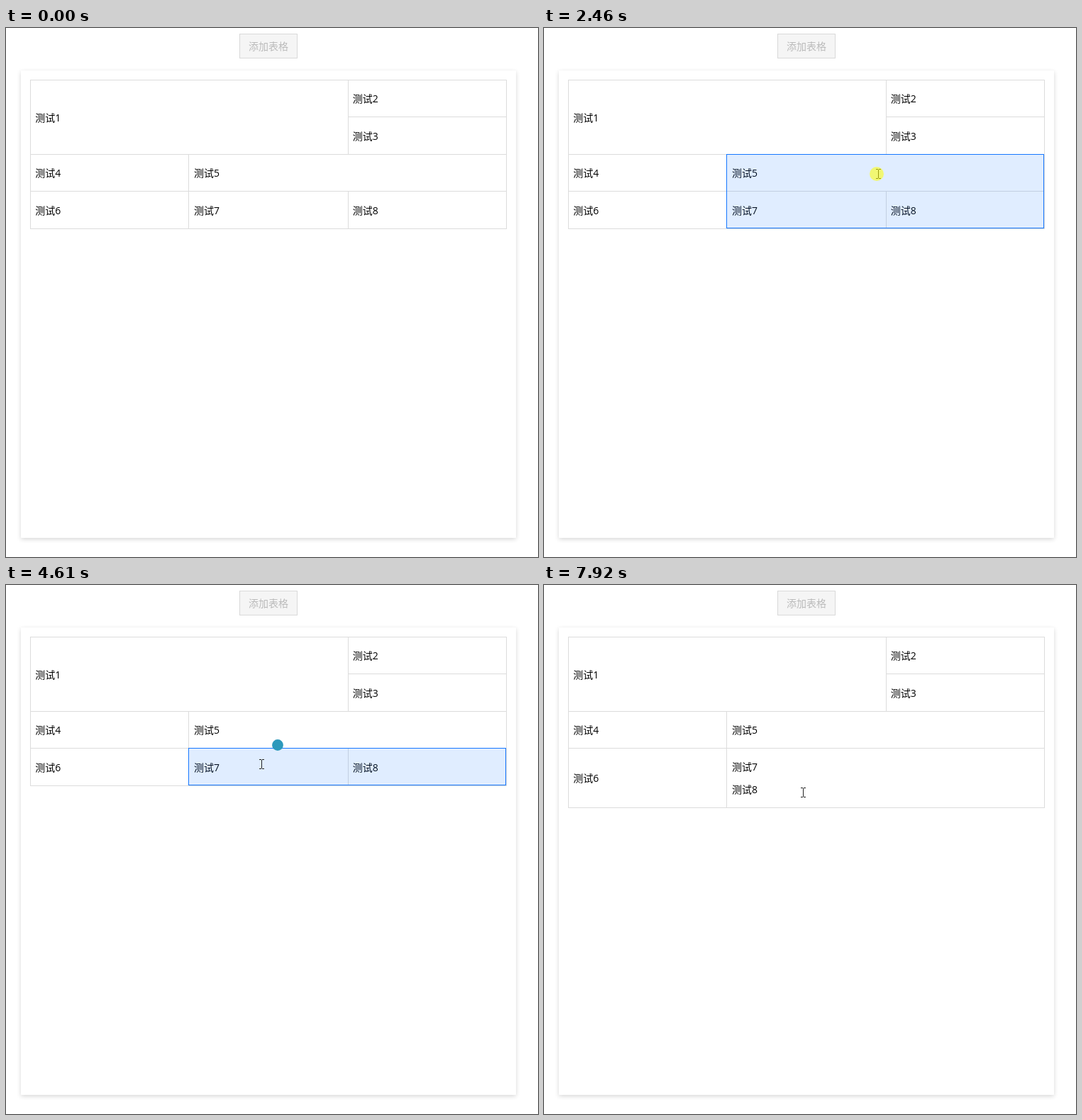
Recreate the animation shown at these times as an HTML page with a canvas. Size 750 by 747 pixels, loop 8 s.

```html
<!DOCTYPE html>
<html lang="zh-CN">
<head>
<meta charset="utf-8">
<title>表格合并</title>
<style>
html, body { margin: 0; width: 100%; height: 100%; overflow: hidden; background: #fff; }
canvas { display: block; width: 750px; height: 747px; }
</style>
</head>
<body>
<canvas id="stage" width="750" height="747"></canvas>
<script>
const ctx = document.getElementById('stage').getContext('2d');
const LOOP = 8000, STEP = 77;
const FONT = '"Open Sans", "Noto Sans CJK SC", "Noto Sans CJK", sans-serif';
const BLUE = '#1677ff', LINE = '#dcdcdc', INK = '#000';

// Grid lines, and one letter per slot as in grid-template-areas
const COLS = [34, 257, 482, 705], ROWS = [73, 125, 178, 230, 283];
const AREAS = ['112', '113', '455', '678'];

const ENTER = 60, MENU_OPEN = 5080, MERGE = 7280;
const DRAGS = [[830, 1535], [1755, 3230], [4060, 4540]];
const CLICKS = [[4990, MENU_OPEN], [7200, MERGE + 20]];
// Pointer moves: start, end, x, y; it rests in between
const MOVES = [
  [ENTER, 830, 528, 259], [930, 1195, 178, 141], [1540, 1750, 406, 234],
  [1850, 2290, 496, 241], [2300, 2460, 470, 205], [2690, 3060, 330, 133],
  [3250, 4060, 566, 256], [4180, 4450, 360, 253], [5200, 5690, 375, 408],
  [6120, 6490, 313, 315], [6490, 7050, 374, 441], [7300, 7921, 365, 293]
];

const MENU = { x: 357, y: 252, w: 110, h: 239 };
const GROUPS = [
  ['向上插入 1 行', '向下插入 1 行', '向左插入 1 列', '向右插入 1 列'],
  ['删除行', '删除列'],
  ['合并单元格', '取消合并']
];

const clamp = v => Math.max(0, Math.min(1, v));
const within = ([from, to], t) => t >= from && t < to;

function rect(x, y, w, h, color) {
  ctx.fillStyle = color;
  ctx.fillRect(x, y, w, h);
}

function frame(x, y, w, h, color) {
  ctx.strokeStyle = color;
  ctx.lineWidth = 1;
  ctx.strokeRect(x + .5, y + .5, w - 1, h - 1);
}

function disc(x, y, r, color) {
  ctx.fillStyle = color;
  ctx.beginPath();
  ctx.arc(x, y, r, 0, Math.PI * 2);
  ctx.fill();
}

function text(str, x, mid, size, color = INK) {
  ctx.font = `${size}px ${FONT}`;
  ctx.fillStyle = color;
  ctx.fillText(str, x, Math.round(mid + size * .36));
}

function panel({ x, y, w, h }, radius, dy, blur, shade) {
  ctx.save();
  ctx.shadowColor = `rgba(0,0,0,${shade})`;
  ctx.shadowOffsetY = dy;
  ctx.shadowBlur = blur;
  ctx.fillStyle = '#fff';
  ctx.beginPath();
  ctx.roundRect(x, y, w, h, radius);
  ctx.fill();
  ctx.restore();
}

function pointer(t) {
  let x = 640, y = 586;
  for (const [from, to, tx, ty] of MOVES) {
    const p = clamp((t - from) / (to - from));
    x += (tx - x) * p;
    y += (ty - y) * p;
  }
  return { x: Math.round(x), y: Math.round(y) };
}

// Slot range of a cell: left, top, right, bottom
function span(id, areas = AREAS) {
  const rows = areas.map((row, i) => row.includes(id) ? i : -1).filter(i => i >= 0);
  const row = areas[rows[0]];
  return [row.indexOf(id), rows[0], row.lastIndexOf(id) + 1, rows[rows.length - 1] + 1];
}

const ids = areas => [...new Set(areas.join(''))];

function cellAt({ x, y }) {
  const slot = (lines, v) => Math.max(0, lines.findLastIndex(line => v >= line));
  return AREAS[slot(ROWS, y)][slot(COLS, x)];
}

// Smallest box around two cells that cuts through no merged cell
function cover(a, b) {
  const join = (p, q) => p.map((v, i) => i < 2 ? Math.min(v, q[i]) : Math.max(v, q[i]));
  let box = join(span(a), span(b));
  for (let pass = 0; pass < 3; pass++) {
    for (const s of ids(AREAS).map(id => span(id))) {
      const hit = s[0] < box[2] && s[2] > box[0] && s[1] < box[3] && s[3] > box[1];
      if (hit) box = join(box, s);
    }
  }
  return box;
}

const textX = col => 41.3 + col * 223.67;

function drawTable(merged) {
  const areas = merged ? [...AREAS.slice(0, 3), '677'] : AREAS;
  const lines = merged ? [...ROWS.slice(0, 4), 314] : ROWS;
  for (const id of ids(areas)) {
    const [l, t, r, b] = span(id, areas);
    frame(COLS[l], lines[t], COLS[r] - COLS[l] + 1, lines[b] - lines[t] + 1, LINE);
    const mid = (lines[t] + lines[b]) / 2 + 1;
    const labels = merged && id === '7' ? ['7', '8'] : [id];
    labels.forEach((label, i) =>
      text('测试' + label, textX(l), mid + (i - (labels.length - 1) / 2) * 31.5, 14));
  }
}

function drawSelection(t) {
  const drag = DRAGS.findLast(([press]) => t >= press);
  if (!drag || t >= MERGE) return;
  const from = cellAt(pointer(drag[0]));
  const to = cellAt(pointer(Math.max(drag[0], Math.min(t - STEP, drag[1]))));
  if (from === to) {
    const [l, top] = span(from);
    rect(Math.round(textX(l) + 34.5), ROWS[top] + 19, 1, 17, INK);
    return;
  }
  const [l, top, r, b] = cover(from, to);
  const box = [COLS[l], ROWS[top], COLS[r] - COLS[l], ROWS[b] - ROWS[top]];
  rect(...box, BLUE + '22');
  frame(...box, BLUE);
}

// Round badge that pops up beside the pointer after each drag
function drawBadge(t) {
  DRAGS.forEach(([, release], i) => {
    const end = DRAGS[i + 1] ? DRAGS[i + 1][0] + 150 : MERGE;
    if (!within([release, end], t)) return;
    const { x, y } = pointer(release);
    disc(x + 23, y - 27, 12.5 * Math.min(1, .4 + (t - release) / 300), '#2d99bb');
  });
}

function inMenu({ x, y }, t) {
  return t > 5200 && t < MERGE && x > MENU.x && x < MENU.x + MENU.w
    && y > MENU.y + 8 && y < MENU.y + MENU.h - 8;
}

function drawMenu(t, pos) {
  const alpha = clamp((t - MENU_OPEN + 60) / 140) * clamp((MERGE + 150 - t) / 150);
  if (t < MENU_OPEN || !alpha) return;
  ctx.save();
  ctx.globalAlpha = alpha;
  panel(MENU, 3, 4, 16, .22);
  let y = MENU.y + 22.4;
  GROUPS.forEach((group, i) => {
    if (i) {
      rect(MENU.x + 3, Math.round(y - 15), MENU.w - 6, 1, '#e2e2e2');
    }
    for (const label of group) {
      const hover = inMenu(pos, t) && Math.abs(pos.y - y) < 13.5;
      const color = label === '取消合并' ? '#bdbdbd' : hover ? BLUE : INK;
      text(label, MENU.x + 10, y, 12, color);
      y += 27;
    }
    y += 2.7;
  });
  ctx.restore();
}

function drawBeam(x, y) {
  rect(x, y - 6, 1, 12, '#222');
  for (const edge of [-7, 6]) {
    rect(x - 3, y + edge, 3, 1, '#222');
    rect(x + 1, y + edge, 3, 1, '#222');
  }
}

const HAND = new Path2D('M4 11V1.5Q5.5-.5 7 1.5V6L12 7Q14 8 13.5 11L12 17H5L.5 10.5Q1 8.5 4 11Z');

function drawHand(x, y) {
  ctx.save();
  ctx.translate(x - 5, y);
  ctx.fillStyle = '#fff';
  ctx.fill(HAND);
  ctx.strokeStyle = '#111';
  ctx.lineWidth = 1;
  ctx.stroke(HAND);
  ctx.restore();
}

function drawPointer(t, pos) {
  if (t < ENTER) return;
  (inMenu(pos, t) ? drawHand : drawBeam)(pos.x, pos.y);
  if ([...DRAGS, ...CLICKS].some(press => within(press, t))) {
    disc(pos.x - 2, pos.y, 10, 'rgba(255,255,0,.55)');
  }
}

function draw(now) {
  // The picture refreshes in even steps
  const t = Math.floor((now % LOOP + 12) / STEP) * STEP - 10;
  const pos = pointer(t);

  rect(0, 0, 750, 747, '#fff');
  rect(329, 8, 82, 35, '#f5f5f5');
  frame(329, 8, 82, 35, '#d9d9d9');
  text('添加表格', 342, 25.5, 14, '#bababa');
  panel({ x: 21, y: 60, w: 698, h: 660 }, 1, 2, 6, .16);
  drawTable(t >= MERGE);
  drawSelection(t);
  drawBadge(t);
  drawMenu(t, pos);
  drawPointer(t, pos);
}

const start = performance.now();
function tick() {
  draw(performance.now() - start);
  requestAnimationFrame(tick);
}
tick();
</script>
</body>
</html>
```
